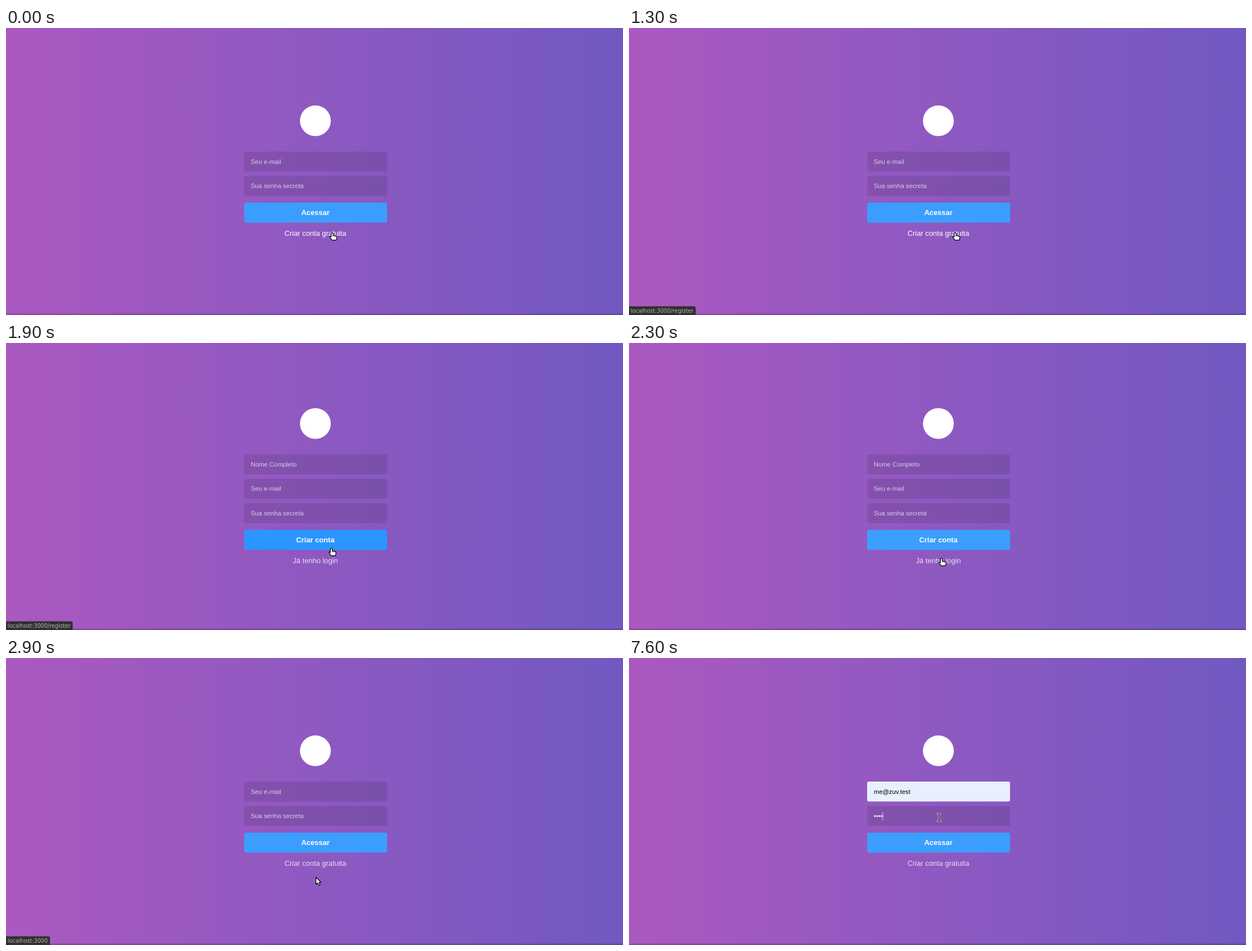
Animation of 1096 by 511 pixels, one loop 8000 ms. Source, as an HTML page:

```html
<!DOCTYPE html>
<html lang="pt-BR">
<head>
<meta charset="utf-8">
<title>Login</title>
<style>
html, body { margin: 0; width: 100%; height: 100%; overflow: hidden; }
body { position: relative; background: linear-gradient(90deg, #ab59c1, #7159c1); }
#shade { position: absolute; left: 0; right: 0; bottom: 0; height: 4px;
  background: linear-gradient(rgba(0,0,0,0), rgba(0,0,0,.25)); }
#scene { position: absolute; left: 0; top: 0; width: 1360px; height: 634px;
  transform: scale(.8058); transform-origin: 0 0;
  font: 16px "Liberation Sans", Arial, sans-serif; color: #fff; }
.page { position: absolute; left: 524.5px; width: 315px; }
#login { top: 171px; }
#register { top: 144px; }
.logo { width: 68px; height: 68px; margin: 0 auto 34px; border-radius: 50%; background: #fff; }
.field, .button { box-sizing: border-box; height: 44px; line-height: 44px; border-radius: 4px; white-space: pre; }
.field { margin-bottom: 10px; padding: 0 15px; font-size: 14px;
  background: rgba(0,0,0,.1); color: rgba(255,255,255,.7); }
.field.filled { background: #e8f0fe; color: #000; }
.field.typed { color: #fff; }
.field.typed::after { content: ""; display: inline-block; width: 1.2px; height: 17px;
  background: #fff; vertical-align: -4px; }
.button { margin-top: 15px; text-align: center; font-weight: bold; background: #3b9eff; }
.link { margin-top: 15px; line-height: 18px; text-align: center; opacity: .8; }
#status { position: absolute; left: 0; top: 614.5px; height: 20px; line-height: 20px; padding: 0 5px 0 3.5px;
  background: #303030; color: #b4b4ac; border-radius: 0 4px 0 0;
  font-family: "DejaVu Sans", sans-serif; font-size: 12px; white-space: pre; }
#cursors { position: absolute; left: 0; top: 0; width: 1096px; height: 511px; }
</style>
</head>
<body>
<div id="shade"></div>
<div id="scene">
  <div class="page" id="login">
    <div class="logo"></div>
    <div class="field" id="email"></div>
    <div class="field" id="secret"></div>
    <div class="button">Acessar</div>
    <div class="link">Criar conta gratuita</div>
  </div>
  <div class="page" id="register">
    <div class="logo"></div>
    <div class="field">Nome Completo</div>
    <div class="field">Seu e-mail</div>
    <div class="field">Sua senha secreta</div>
    <div class="button">Criar conta</div>
    <div class="link">Já tenho login</div>
  </div>
  <div id="status"></div>
</div>
<svg id="cursors" viewBox="0 0 1096 511" stroke-linejoin="round" stroke-linecap="round">
  <g id="hand" fill="#fff" stroke="#000" stroke-width="1.2">
    <path d="M-1.7 1Q-1.6-.6 0-.6T1.6 1V4L6.4 5Q8.4 5.4 8.2 7.6L7.3 12.7H-.4L-4.2 7.8Q-4.7 6 -3 6.2L-1.7 7.3Z"/>
    <path d="M1.6 4V6M3.9 4.7V6.4M6.1 5.2V6.8" stroke-width=".8"/>
  </g>
  <path id="arrow" fill="#fff" stroke="#000" stroke-width="1.2"
    d="M.6.6V13L3.5 10.4 5.5 14.8 7.8 13.8 5.9 9.5H9.6Z"/>
  <g id="beam" fill="none">
    <path id="bar" stroke="#fff" stroke-width="2.8" d="M-2.5-6.3Q0-6.3 0-5Q0-6.3 2.5-6.3M0-5V5M-2.5 6.3Q0 6.3 0 5Q0 6.3 2.5 6.3"/>
    <path stroke="#000" stroke-width="1.3" d="M-2.5-6.3Q0-6.3 0-5Q0-6.3 2.5-6.3M0-5V5M-2.5 6.3Q0 6.3 0 5Q0 6.3 2.5 6.3"/>
  </g>
</svg>
<script>
const LOOP = 8000;
const $ = id => document.getElementById(id);

// [start ms, value...]; each row holds until the next one
const pointer = [
  [0, 'hand', 579.5, 365],
  [1900, 'hand', 578, 366],
  [2000, 'arrow', 574, 369],
  [2100, 'arrow', 567, 373],
  [2200, 'hand', 560, 380],
  [2300, 'hand', 555, 384],
  [2400, 'hand', 552, 388],
  [2500, 'hand', 550.5, 390],
  [2900, 'arrow', 550, 390],
  [3200, 'arrow', 551, 383],
  [3300, 'arrow', 553, 350],
  [3400, 'arrow', 554, 339],
  [7600, 'beam', 550.8, 284]
];
const pages = [[0, 'login'], [1400, 'register'], [2900, 'login']];
const hints = [
  [0, ''], [600, 'localhost:3000/register'], [2000, ''],
  [2700, 'localhost:3000'], [3200, '']
];

const at = (rows, t) => rows.findLast(row => row[0] <= t);
const ramp = (t, from, ms) => Math.min(1, Math.max(0, (t - from) / ms));
const mix = (a, b, k) => a + (b - a) * k;

function setField(el, text, kind) {
  el.textContent = text;
  el.className = 'field ' + kind;
}

function draw(t) {
  const page = at(pages, t)[1];
  for (const id of ['login', 'register']) {
    $(id).style.visibility = id === page ? 'visible' : 'hidden';
  }

  const done = t >= 7600;
  setField($('email'), done ? 'me@zuv.test' : 'Seu e-mail', done ? 'filled' : '');
  setField($('secret'), done ? '••••' : 'Sua senha secreta', done ? 'typed' : '');

  const lit = page === 'register' ? 1 - ramp(t, 2000, 200) : 0;
  const glow = page === 'register' ? ramp(t, 2300, 200) : t < 1400 ? 1 : 0;
  $(page).querySelector('.button').style.background =
    `rgb(${mix(59, 43, lit)}, ${mix(158, 150, lit)}, 255)`;
  $(page).querySelector('.link').style.opacity = mix(.8, 1, glow);

  const hint = at(hints, t)[1];
  $('status').textContent = hint;
  $('status').style.display = hint ? 'block' : 'none';

  const [, kind, x, y] = at(pointer, t);
  for (const id of ['hand', 'arrow', 'beam']) {
    $(id).style.display = id === kind ? '' : 'none';
  }
  $(kind).setAttribute('transform', `translate(${x} ${y})`);
}

const start = performance.now();
function tick() {
  draw((performance.now() - start) % LOOP);
  requestAnimationFrame(tick);
}
tick();
</script>
</body>
</html>
```
